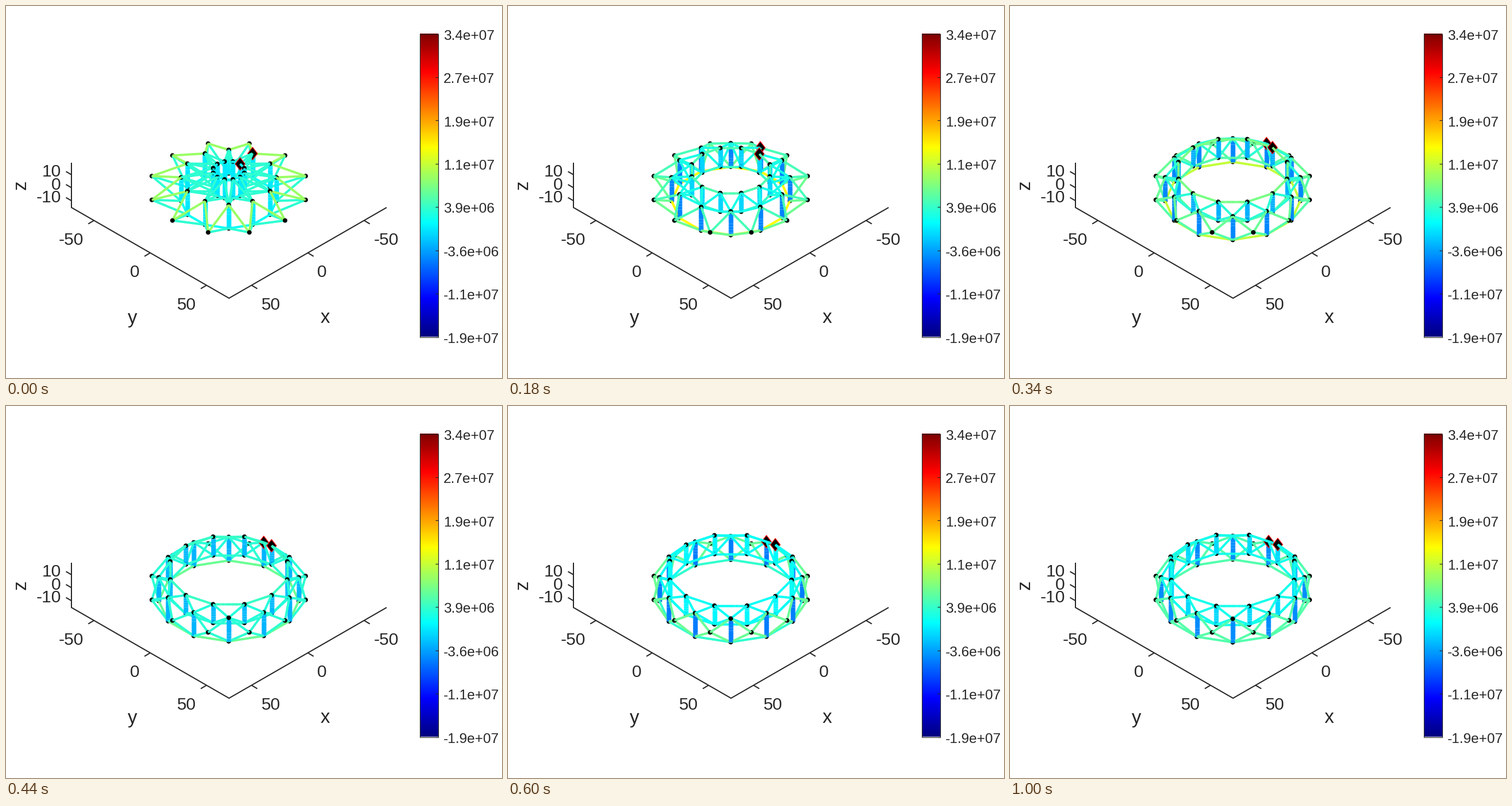
Animation, 864 px wide and 648 px high, one loop 1.02 s. Source, as a matplotlib script:

```python
import numpy as np
import matplotlib.pyplot as plt
from matplotlib.animation import FuncAnimation
from matplotlib.collections import PolyCollection
from matplotlib.colors import ListedColormap

W, H, DPI = 864, 648, 100
FRAMES, STEP = 51, 20
PT = 72 / DPI
INK = "#262626"
CX, CY = 388, 317
TILT = 1 / np.sqrt(3)            # sine of the view elevation
N = 12
LOW, HIGH = -1.87e7, 3.4e7       # stress range of the colour scale
PIECES = 8

plt.rcParams["font.family"] = "Liberation Sans"


def jet(v):
    v = np.asarray(v, float)[..., None]
    return np.clip(1.5 - np.abs(4 * v - np.array([3, 2, 1])), 0, 1)


# Stress of each member group in MPa at the key times
KEYS = [0, 120, 260, 440, 600, 760, 1000]
STRESS = {
    "outer ridge": [9, 1.6, 9, 3.2, 6.4, 6.4, 5.3],
    "outer diagonal": [3.4, 6.5, 7, 3.4, 6.6, 6.6, 5.5],
    "outer hoop": [1.6, 14.2, 14.8, 6.6, 3.6, 3.3, 5.3],
    "outer strut": [0, -4, -7, -2.8, -5.7, -5.6, -4.9],
    "inner ridge": [3.4, 1.4, 3.4, 2.9, 1.6, 1.7, 2.1],
    "inner diagonal": [3.4, 1.4, 3.6, 2.9, 1.6, 1.7, 2.1],
    "top hoop": [1.6, 1.4, 10, 4, 1.6, 1.7, 2.1],
    "low hoop": [1.6, 1.4, 7, 3.4, 1.6, 1.7, 2.1],
    "inner strut": [0, 0.6, -3.4, -2.5, 0.7, 0.6, -0.9],
}

# Nodes: five rings of twelve
FIX, OT, OB, IT, IB = np.arange(5 * N).reshape(5, N)


def both(a, b, shift):
    """Join each node of ring a with its two neighbours in ring b."""
    return np.vstack([np.c_[a, b], np.c_[a, np.roll(b, shift)]])


def hoop(a):
    return np.c_[a, np.roll(a, -1)]


MEMBERS = {
    "outer ridge": both(FIX, OT, -1),
    "outer diagonal": both(FIX, OB, -1),
    "outer hoop": hoop(OB),
    "outer strut": np.c_[OT, OB],
    "inner ridge": both(IT, OT, -1),
    "inner diagonal": both(IB, OT, -1),
    "top hoop": hoop(IT),
    "low hoop": hoop(IB),
    "inner strut": np.c_[IT, IB],
}
LINKS = np.vstack(list(MEMBERS.values()))
WIDTHS = np.concatenate([np.full(len(m), 8.0 if "strut" in k else 4.0)
                         for k, m in MEMBERS.items()])


def nodes(t):
    """Screen x, screen y and nearness to the viewer of every node."""
    d = 82.9 * (1 - np.exp(-(t / 225) ** 1.5))
    inner, outer = 28 + d, 83 + 0.44 * d + 0.0008 * d * d
    rings = [(138.7, 0, 15), (outer, -18.5, 0), (outer, 22.5, 0),
             (inner, -30.5, 15), (inner, 2, 15)]
    out = []
    for r, drop, turn in rings:
        a = np.radians(turn + 30 * np.arange(N))
        x, y = r * np.cos(a), r * np.sin(a)
        near = y * np.sqrt(2 / 3) - drop * np.sqrt(0.5)
        out.append(np.c_[CX + x, CY + drop + y * TILT, near])
    return np.vstack(out)


ROUND = 4 * np.array([(np.cos(a), np.sin(a))
                      for a in np.linspace(0, 2 * np.pi, 20, endpoint=False)])
DIAMOND = np.array([(0, -11), (8.5, 0), (0, 11), (-8.5, 0)])


def scene(t):
    p = nodes(t)
    a, b = p[LINKS[:, 0]], p[LINKS[:, 1]]
    u = (b - a)[:, :2]
    u = u / np.maximum(np.linalg.norm(u, axis=1), 1e-6)[:, None]
    side = np.c_[-u[:, 1], u[:, 0]] * WIDTHS[:, None] / 2
    values = np.concatenate([np.full(len(m), np.interp(t, KEYS, STRESS[k]))
                             for k, m in MEMBERS.items()]) * 1e6
    colors = jet((values - LOW) / (HIGH - LOW))

    shapes, fills, edges, depth = [], [], [], []

    def add(shape, near, fill, edge="none"):
        shapes.append(shape)
        depth.append(near)
        fills.append((*fill, 1))
        edges.append((1, 0, 0, 1) if edge == "red" else (0, 0, 0, 0))

    # Short pieces let crossing members hide each other correctly
    for i in range(PIECES):
        s = a + (b - a) * i / PIECES
        e = a + (b - a) * (i + 1) / PIECES
        over = 0.6 * u * (i < PIECES - 1)
        s2, e2 = s[:, :2], e[:, :2] + over
        quads = np.stack([s2 + side, e2 + side, e2 - side, s2 - side], axis=1)
        for q, z, c in zip(quads, (s[:, 2] + e[:, 2]) / 2, colors):
            add(q, z, c)
    for x, y, z in p:
        add(ROUND + (x, y), z, (0, 0, 0))
    for k in (OT[10], IT[10]):
        add(DIAMOND + p[k, :2], p[k, 2] + 0.01, (0, 0, 0), "red")

    order = np.argsort(depth, kind="stable")
    return ([shapes[i] for i in order], [fills[i] for i in order],
            [edges[i] for i in order])


fig = plt.figure(figsize=(W / DPI, H / DPI), dpi=DPI, facecolor="white")
ax = fig.add_axes([0, 0, 1, 1])
ax.axis("off")


def line(xs, ys, width=2.0):
    ax.plot(xs, ys, color=INK, lw=width * PT, solid_capstyle="butt",
            solid_joinstyle="miter", zorder=1)


def label(x, y, text, size=30, ha="center"):
    ax.text(x, y + 0.355 * size, text, fontsize=size * PT, color=INK,
            ha=ha, va="baseline")


# Axes of the 3D box
line([114, 114, 388.5, 663], [273, 351, 509, 351])
for v in (-50, 0, 50):
    f = (v + 70) / 140
    x, y = 274.5 * f, 351 + 158 * f
    line([114 + x, 104 + x], [y, y + 6])
    line([663 - x, 673 - x], [y, y + 6])
    label((113, 224, 314)[v // 50 + 1], 405 + 56.5 * (v // 50 + 1), str(v))
    label((662, 550, 461)[v // 50 + 1], 405 + 56.5 * (v // 50 + 1), str(v))
for v in (10, 0, -10):
    y = 316.5 - 2.266 * v
    line([114, 104.5], [y, y - 5.5])
    label(96, 309 - 2.25 * v, str(v), ha="right")

ax.text(556, 552.5, "x", fontsize=33 * PT, color=INK, ha="center", va="baseline")
ax.text(220, 552.5, "y", fontsize=33 * PT, color=INK, ha="center", va="baseline")
ax.text(35, 312, "z", fontsize=33 * PT, color=INK, rotation=90, ha="center",
        va="baseline", rotation_mode="anchor")

# Colour scale
L, R, T, B = 721, 752.5, 48.5, 576.5
ax.imshow(np.linspace(1, 0, 256)[:, None], extent=(L, R, B, T), aspect="auto",
          cmap=ListedColormap(jet(np.linspace(0, 1, 256))),
          interpolation="nearest", zorder=1)
line([L, R, R, L, L], [T, T, B, B, T], 1.2)
ticks = ["3.4e+07", "2.7e+07", "1.9e+07", "1.1e+07",
         "3.9e+06", "-3.6e+06", "-1.1e+07", "-1.9e+07"]
for i, s in enumerate(ticks):
    y = T + (B - T) * i / 7
    line([R - 5, R], [y, y], 1.2)
    label(762, y + 1.5, s, 24.4, "left")

ax.set_xlim(0, W)
ax.set_ylim(H, 0)

truss = PolyCollection([], linewidths=1.2 * PT, zorder=3)
ax.add_collection(truss, autolim=False)


def draw(i):
    shapes, fills, edges = scene(i * STEP)
    truss.set_verts(shapes)
    truss.set_facecolor(fills)
    truss.set_edgecolor(edges)
    return [truss]


anim = FuncAnimation(fig, draw, frames=FRAMES, interval=STEP,
                     repeat=True, repeat_delay=0, blit=False)
plt.show()
```
